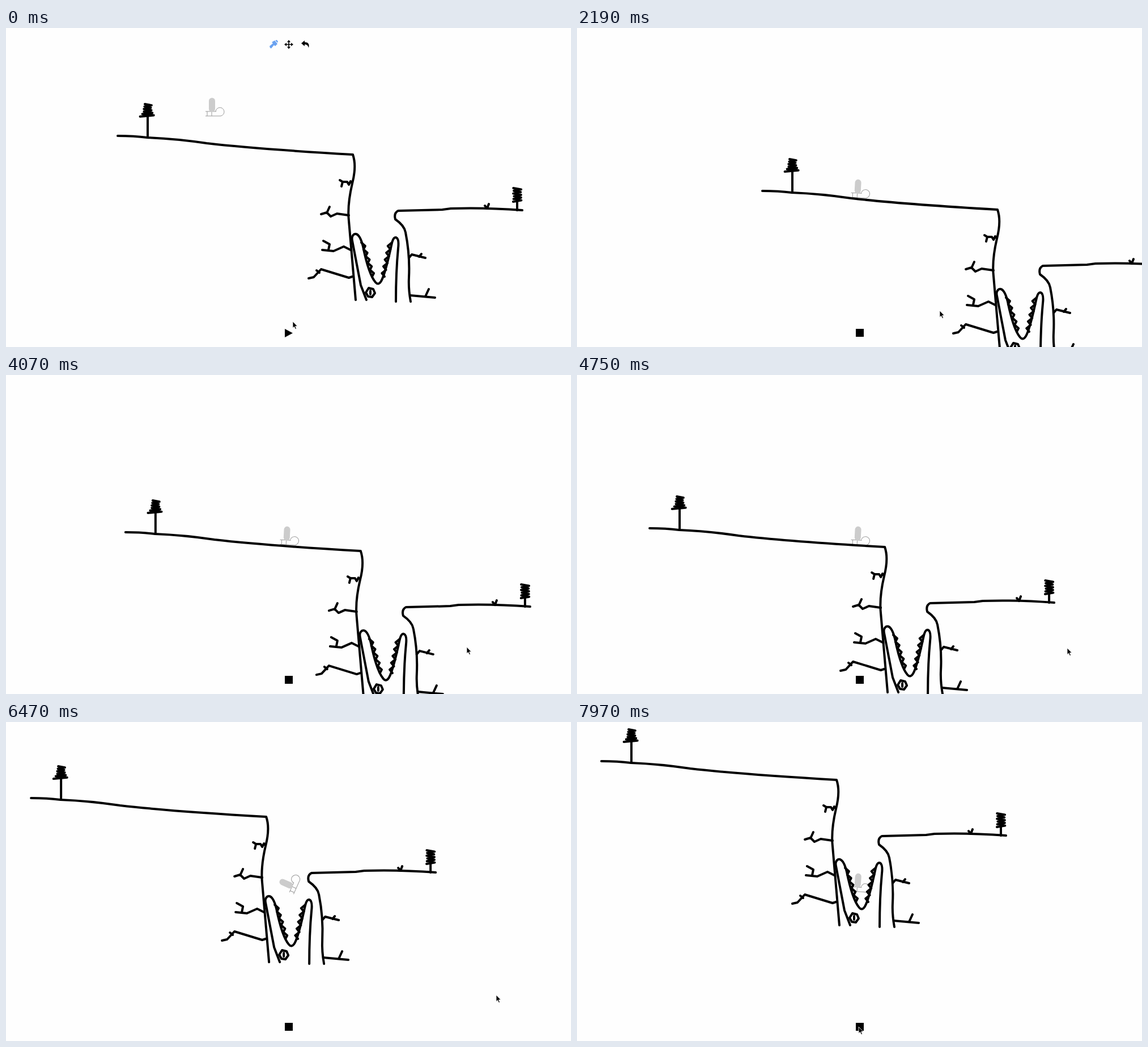
An HTML page for the animation above (8000 ms loop, 997x562 px).

```html
<!DOCTYPE html>
<html>
<head>
<meta charset="utf-8">
<style>
html, body { margin: 0; width: 100%; height: 100%; overflow: hidden; background: #fefefe; }
svg { display: block; width: 997px; height: 562px; }
#world { fill: none; stroke: #000; stroke-width: 4; stroke-linecap: round; stroke-linejoin: round; }
#rider { fill: none; stroke: #999; stroke-width: 1; }
</style>
</head>
<body>
<svg viewBox="0 0 997 562">
  <g id="rider">
    <path d="M-15 8H4M-12 8V16M-4 8V16M-15 16H9A7.5 7.5 0 1 0 3 8"/>
    <rect x="-9" y="-16" width="11" height="25" rx="5.5" fill="#ccc" stroke="none"/>
  </g>
  <g id="world">
    <!-- ledges and cliffs -->
    <path d="M197 190Q226 190 249 193Q300 195 354 203Q440 213 612 223Q619 243 611 274Q602 312 605 340Q610 400 617 479"/>
    <path d="M911 321Q845 316 785 318L770 320 692 322Q684 326 687 337Q703 348 705 360Q713 400 711 440Q710 460 714 482"/>
    <!-- roots and grass -->
    <path d="M589 268L594 271H602L605 276 608 270 611 273M594 271L592 279"/>
    <path d="M556 328L566 325 573 332 584 327 605 330M566 326L571 315"/>
    <path d="M560 375L571 381 569 391M558 391L578 393 596 385 608 391"/>
    <path d="M534 441L543 439 556 425 605 440 611 438M548 427L553 431"/>
    <path d="M711 405L716 399 740 405M729 403L733 398M713 471L757 475M740 473L746 460M845 313L849 318 852 310"/>
    <!-- crocodile -->
    <path d="M636 479L626 453 611 375C609 366 614 362 618 363Q625 365 630 385Q640 434 652 448Q657 454 662 446Q669 434 680 383Q683 368 688 369Q694 371 692 388Q688 430 688 482"/>
    <path d="M640 458L648 460 651 467 646 474 639 473 635 466ZM643 463V469"/>
    <!-- scribbles are added below -->
  </g>
  <g id="tools">
    <path d="M466 35L465 32 471 27 469 25 474 22 479 28 475 32 473 30 468 36ZM475 22L478 21 480 24 479 26Z" fill="#6aa2f0"/>
    <g id="arrows" transform="translate(499 29)"></g>
    <path d="M521 27L527 22V25C533 25 536 28 534 35C533 31 531 29 527 29V32Z"/>
  </g>
  <path id="button"/>
  <path id="cursor" d="M0 0V11.5L2.6 9.2 4.6 13.6 6.5 12.8 4.6 8.5H8.2Z" stroke="#fff" stroke-width=".8"/>
</svg>
<script>
const LOOP = 8000, PLAY_AT = 1670, STEP = 171; // ms
const HOME = { x: 499, y: 283 }, START = { x: 132, y: 144 };
const PLAY = "M492 530L506 537.5 492 545Z", STOP = "M492 530H506V544H492Z";
const HALF_G = 140; // px/s², half of gravity

// Seconds after play
const LAND = 0.513, TOP_SPEED = 3.078, EDGE = 3.315, HIT = 4.104, MOUTH = 5.14;

const el = id => document.getElementById(id);
const lerp = (a, b, k) => a + (b - a) * k;
const clamp = k => Math.min(1, Math.max(0, k));
const drop = s => HALF_G * Math.max(0, s) ** 2;

let seed = 7;
const random = () => (seed = seed * 16807 % 2147483647) / 2147483647;

function add(parent, d) {
  const path = document.createElementNS("http://www.w3.org/2000/svg", "path");
  path.setAttribute("d", d);
  el(parent).append(path);
  return path;
}

// Zigzag of n points; at(u, side) gives a point for u in 0..1
function zigzag(n, at) {
  const points = Array.from({ length: n }, (_, i) => at(i / (n - 1), i % 2));
  return add("world", "M" + points.join("L"));
}

function tree(x, top, bottom, ground, width) {
  zigzag(11, (u, side) => [x + (side ? 1 : -1) * (width(u) + 2 * random()), lerp(top, bottom, u)]);
  add("world", `M${x} ${bottom}V${ground}`);
}

function teeth(x0, x1, size) {
  zigzag(11, (u, side) => [lerp(x0, x1, u) + side * size, lerp(378, 438, u)]);
}

tree(250, 134, 156, 191, u => 5 + 7 * u ** 4);
tree(902, 282, 306, 321, () => 5.5);
teeth(627, 646, 5);
teeth(681, 668, -6);
for (const turn of [0, 90, 180, 270])
  add("arrows", "M0 -8L3 -4H.8V0H-.8V-4H-3Z").setAttribute("transform", `rotate(${turn})`);

// World offset and rider tilt, p seconds after play
function ride(p) {
  if (p < LAND) return [START.x - 4 * p, Math.max(97, START.y - drop(p + 0.05)), 3 * p / LAND];
  if (p <= HIT) {
    const roll = Math.min(p, TOP_SPEED) - LAND, coast = Math.max(0, p - TOP_SPEED);
    const x = 130 - 18.3 * roll - 23.1 * roll ** 2 - 126 * coast;
    return [x, 85.9 + 0.0854 * x - drop(p - EDGE), 3 + 5 * coast];
  }
  const fall = Math.min(p, MOUTH) - HIT, rest = clamp((p - MOUTH) / 0.33);
  const x = Math.min(-198 + 66 * fall, -146), y = -18 - drop(fall - 0.163);
  return [lerp(x, -154, rest), lerp(y, -121, rest), lerp(8 - 108 * fall, 4, rest)];
}

// Pointer stops after play: seconds, x, y
const stops = [
  [0, 497, 537], [0.513, 640, 498], [1.539, 748, 477], [3.078, 865, 481],
  [5.1, 865, 481], [5.472, 771, 521], [6.1, 497, 537]
];

function pointer(p) {
  if (p < 0) {
    const u = clamp(1 + (p + 0.63) / 1.04), swing = Math.sin(Math.PI * u);
    return [506 - 9 * u + 291 * swing, 517 + 20 * u + 22 * swing];
  }
  const i = stops.findLastIndex(s => s[0] <= p), a = stops[i], b = stops[i + 1] ?? a;
  const k = clamp((p - a[0]) / (b[0] - a[0] || 1));
  return [lerp(a[1], b[1], k), lerp(a[2], b[2], k)];
}

const move = (id, x, y, turn = 0) =>
  el(id).setAttribute("transform", `translate(${x} ${y}) rotate(${turn})`);

function draw(time) {
  const p = Math.floor((time - PLAY_AT) / STEP) * STEP / 1000, playing = p >= 0;
  const [x, y, tilt] = playing ? ride(p) : [0, 0, 0];
  move("world", x, y);
  if (playing) move("rider", HOME.x, HOME.y, tilt);
  else move("rider", HOME.x - START.x, HOME.y - START.y);
  move("cursor", ...pointer(p));
  el("tools").style.display = playing ? "none" : "";
  el("button").setAttribute("d", playing ? STOP : PLAY);
}

function loop() {
  draw(performance.now() % LOOP);
  requestAnimationFrame(loop);
}
loop();
</script>
</body>
</html>
```
